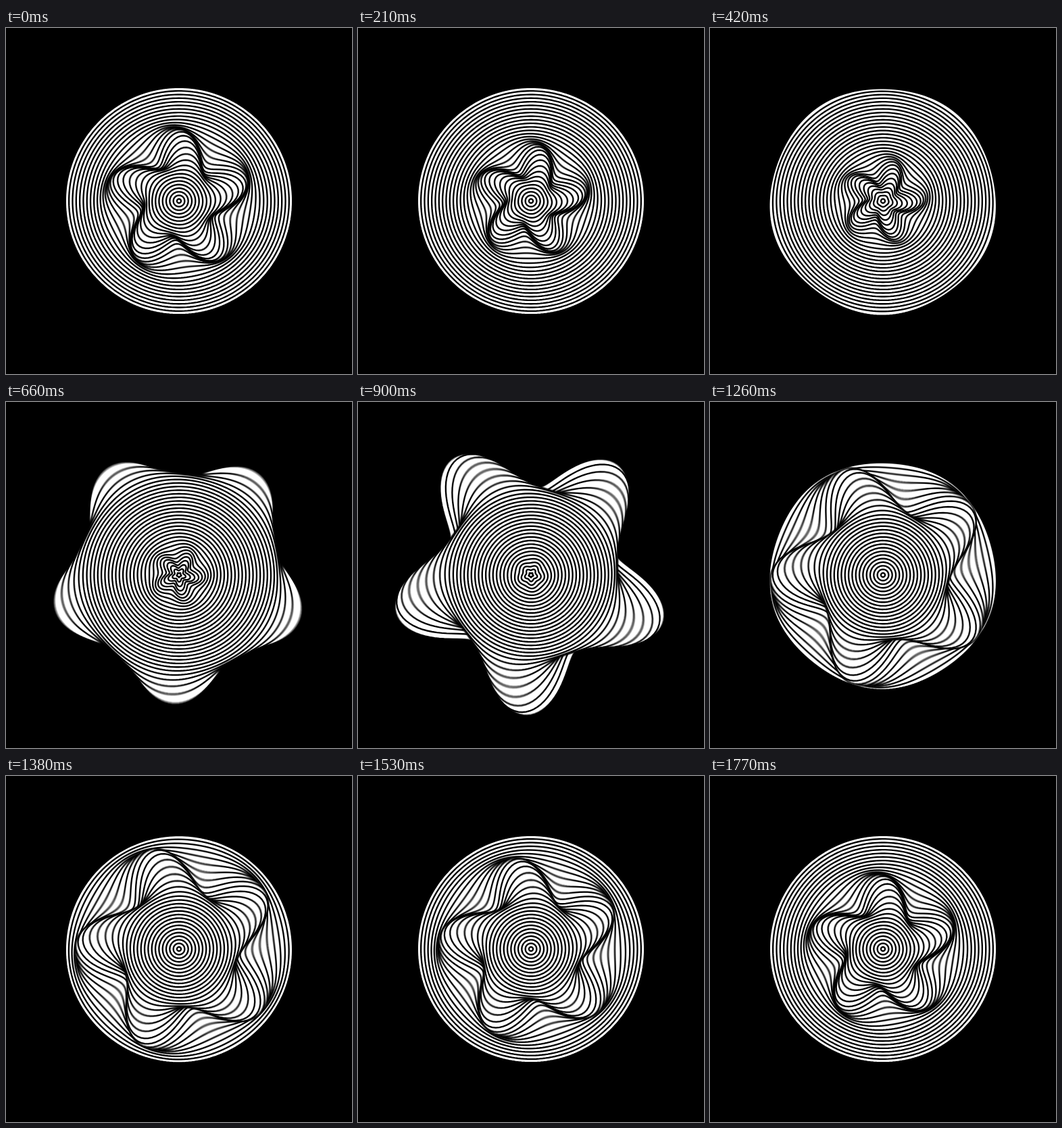
Animation of 512 by 512 pixels, one loop 1800 ms. Source, as an HTML page with a canvas:

```html
<!DOCTYPE html>
<html lang="en">
<head>
<meta charset="utf-8">
<title>Rippling rings</title>
<style>
  html, body { margin: 0; width: 100%; height: 100%; overflow: hidden; background: #000; }
  canvas { display: block; width: 100vmin; height: 100vmin; margin: 0 auto; }
</style>
</head>
<body>
<canvas id="view" width="512" height="512"></canvas>
<script>
const SIZE = 512, TAU = Math.PI * 2;
const LOOP = 1800, STEP = 30;
const RINGS = 32, R_MIN = 3, R_MAX = 168.2, LINE = 2.4;
const SAMPLES = 10, SHUTTER = 30;
const PEAK = 845, SPREAD = 165 / LOOP, SWELL = 0.25;

const view = document.getElementById("view").getContext("2d", { alpha: false });
const layer = document.createElement("canvas");
layer.width = layer.height = SIZE;
const pen = layer.getContext("2d", { alpha: false });

// How strongly ring i bulges at time t; the pulse travels inwards.
function pulse(i, t) {
  let u = (t - PEAK) / LOOP + (i + 1) / RINGS - 1;
  u -= Math.round(u);
  return Math.exp(-u * u / (2 * SPREAD * SPREAD));
}

function ring(i, t) {
  const r = R_MIN + (R_MAX - R_MIN) * i / (RINGS - 1);
  const amp = SWELL * r * pulse(i, t);
  const twist = TAU * i / RINGS;
  const count = 60 + Math.round(r);
  pen.beginPath();
  for (let k = 0; k < count; k++) {
    const a = TAU * k / count;
    const d = r + amp * Math.sin(5 * a + twist);
    pen.lineTo(SIZE / 2 + d * Math.cos(a), SIZE / 2 + d * Math.sin(a));
  }
  pen.closePath();
  pen.fill();
  pen.stroke();
}

function drawRings(t) {
  pen.fillStyle = "#000";
  pen.fillRect(0, 0, SIZE, SIZE);
  pen.fillStyle = "#fff";
  pen.strokeStyle = "#000";
  pen.lineWidth = LINE;
  pen.lineJoin = "round";
  for (let i = RINGS - 1; i >= 0; i--) ring(i, t);
}

// Average several moments for motion blur.
function render(t) {
  view.globalCompositeOperation = "source-over";
  view.globalAlpha = 1;
  view.fillStyle = "#000";
  view.fillRect(0, 0, SIZE, SIZE);
  view.globalCompositeOperation = "lighter";
  view.globalAlpha = 1 / SAMPLES;
  for (let s = 0; s < SAMPLES; s++) {
    drawRings(t + SHUTTER * ((s + 0.5) / SAMPLES - 0.5));
    view.drawImage(layer, 0, 0);
  }
}

const start = performance.now();
let shown = -1;

function tick() {
  const t = Math.max(0, performance.now() - start) % LOOP;
  const step = Math.floor(t / STEP);
  if (step !== shown) {
    shown = step;
    render(step * STEP);
  }
  requestAnimationFrame(tick);
}
tick();
</script>
</body>
</html>
```
